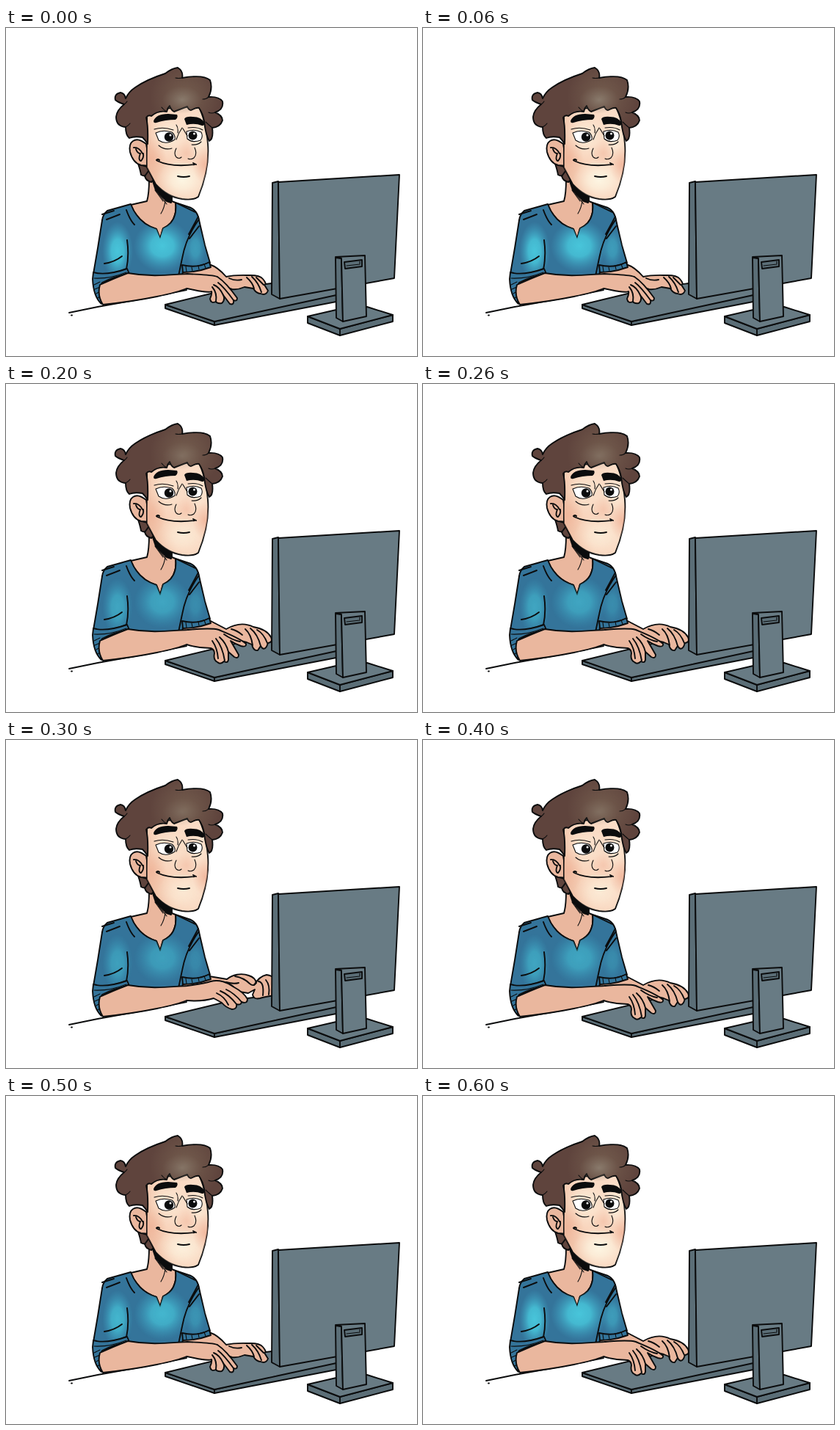
An HTML page that plays this animation: 560 px wide and 447 px high, repeating every 700 ms.

```html
<!DOCTYPE html>
<html lang="en">
<head>
<meta charset="utf-8">
<title>Man typing</title>
<style>
html, body { margin: 0; width: 100%; height: 100%; overflow: hidden; background: #fff; }
svg { display: block; width: 560px; height: 447px; }
.ink { stroke: #0b0c0d; stroke-width: 1.9; stroke-linejoin: round; stroke-linecap: round; fill: none; }
.thin { stroke-width: 1.1; }
.skin { fill: #eab79e; }
.hair { fill: url(#hairTone); }
.shirt { fill: #34749a; }
.panel { fill: #687b84; }
.side { fill: #5b6e77; }
.flat { stroke: none; }
.dark { fill: #0b0c0d; }
</style>
</head>
<body>
<svg viewBox="0 0 560 447">
  <defs>
    <radialGradient id="hairTone" gradientUnits="userSpaceOnUse" cx="244" cy="94" r="48">
      <stop offset="0" stop-color="#755e4f"/><stop offset="1" stop-color="#5f443d"/>
    </radialGradient>
    <linearGradient id="faceTone" gradientUnits="userSpaceOnUse" x1="190" y1="180" x2="262" y2="160">
      <stop offset="0" stop-color="#efbfa4"/><stop offset=".4" stop-color="#f9d5bd"/><stop offset="1" stop-color="#fadcc6"/>
    </linearGradient>
    <radialGradient id="blue">
      <stop offset="0" stop-color="#48c5da"/><stop offset=".4" stop-color="#45bcd3" stop-opacity=".95"/><stop offset="1" stop-color="#3f9fc0" stop-opacity="0"/>
    </radialGradient>
    <radialGradient id="pale">
      <stop offset="0" stop-color="#fdf6e3"/><stop offset=".4" stop-color="#fcf1dd" stop-opacity=".8"/><stop offset="1" stop-color="#fcebd8" stop-opacity="0"/>
    </radialGradient>
    <radialGradient id="blush">
      <stop offset="0" stop-color="#eeab90" stop-opacity=".7"/><stop offset="1" stop-color="#eeb398" stop-opacity="0"/>
    </radialGradient>
    <radialGradient id="shine">
      <stop offset="0" stop-color="#958a7c" stop-opacity=".65"/><stop offset="1" stop-color="#85766a" stop-opacity="0"/>
    </radialGradient>
    <path id="torso" d="M170 240L138 249Q132 254 131 262L125 300L119 335Q140 338 164 328L163 342H240L241 330 278 320 271 296 264 266Q262 250 252 245L231 238Q234 264 214 273L210 287 205 274Q180 266 170 240Z"/>
    <path id="head" d="M192 112L262 106Q272 125 275 158C277 184 271 208 262 230Q256 235 240 233Q220 230 204 213L192 190Z"/>
    <clipPath id="inTorso"><use href="#torso"/></clipPath>
    <clipPath id="inHead"><use href="#head"/></clipPath>
  </defs>

  <g class="ink">
    <path d="M86 388L125 380Q185 370 246 357M89 391.5h1"/>
    <path class="side" d="M217 377V382L284 405 450 373V362L284 400Z"/>
    <path class="panel" d="M217 377L312 354 362 348 450 350V364L284 400Z"/>
    <path d="M284 400V405"/>

    <path id="far" class="skin"/>
    <path id="farLines"/>

    <path class="skin" d="M195 206Q195 226 192 236L170 241Q180 266 205 274L210 287 214 273Q234 264 231 238L226 236V226L200 204Z"/>
    <use href="#torso" class="shirt"/>
    <g class="flat" clip-path="url(#inTorso)">
      <g class="glow">
        <ellipse cx="152" cy="304" rx="21" ry="40" fill="url(#blue)"/>
        <ellipse cx="213" cy="297" rx="39" ry="36" fill="url(#blue)"/>
        <ellipse cx="258" cy="300" rx="15" ry="28" fill="url(#blue)" opacity=".5"/>
      </g>
    </g>
    <path d="M164 329Q168 310 165 289M131 254L147 249M137 261L155 254M262 262Q245 286 240 314L235 338M263 270L250 287M233 239L258 251M262 257L249 281M164 248Q169 262 175 268M134 321Q148 319 158 311"/>
    <path class="shirt" d="M119 333Q136 338 165 328L168 335Q149 338 131 347Q127 353 130 376Q119 366 118 342ZM240 323Q261 328 277 319L279 326Q260 333 241 333Z"/>
    <path class="thin" d="M120 341Q142 342 164 333M120 350L128 346M121 356L128 353M123 362L128 359M125 368L129 365M245 325L246 332M253 326L254 331M262 324L263 329M270 322L272 327"/>
    <path id="near" class="skin"/>
    <path id="nearLines"/>
  </g>

  <!-- Head -->
  <g class="ink">
    <path class="dark" d="M199 206L204 221 219 236 225 238V230Q211 222 199 206Z"/>
    <path class="thin" d="M203 221L214 236M208 226L219 240M217 235Q216 245 211 253"/>
    <path class="hair" d="M180 185Q183 194 184 200Q187 202 189 201Q190 208 198 210L202 206 195 190Z"/>
    <path d="M189 202L194 195"/>
    <path class="skin" d="M191 158Q180 149 173 154Q167 158 169 169Q173 184 184 187L196 188Z"/>
    <path d="M174 163Q181 162 186 171M177 165Q179 171 183 171Q180 179 183 181M187 171Q188 177 184 181"/>
    <use href="#head" fill="url(#faceTone)"/>
    <g class="flat" clip-path="url(#inHead)">
      <g class="glow">
        <ellipse cx="240" cy="207" rx="36" ry="29" fill="url(#pale)"/>
        <ellipse cx="222" cy="146" rx="30" ry="34" fill="url(#pale)" opacity=".6"/>
        <ellipse cx="262" cy="148" rx="16" ry="34" fill="url(#pale)" opacity=".6"/>
      </g>
      <ellipse cx="246" cy="171" rx="17" ry="18" fill="url(#blush)" opacity=".55"/>
      <ellipse cx="271" cy="186" rx="17" ry="26" fill="url(#blush)"/>
      <ellipse cx="198" cy="178" rx="20" ry="30" fill="url(#blush)" opacity=".8"/>
    </g>
    <path class="hair" d="M193 158Q194 134 191 122Q194 118 198 120Q207 112 219 114Q220 109 223 106Q225 112 229 114Q239 110 247 107Q249 112 252 112Q260 108 263 109Q268 116 270 127Q272 146 277 154Q283 151 281 136Q292 135 295 126Q295 119 285 115Q297 111 295 100Q290 93 276 94Q282 82 278 71Q269 63 240 68Q242 59 234 54Q226 55 217 62Q192 70 176 81Q167 87 163 96Q162 89 156 88Q147 90 149 98Q152 101 161 104Q151 112 150 121Q150 134 163 135Q163 146 168 150Q175 147 186 149Q190 153 193 158Z"/>
    <ellipse class="glow flat" cx="240" cy="98" rx="27" ry="19" fill="url(#shine)"/>
    <path class="thin" d="M161 104Q163 103 165 100M163 135Q167 133 169 130M240 68Q235 69 231 68M276 94Q273 97 268 97M285 115Q280 117 276 115M272 128Q276 132 281 136M219 114Q214 111 212 108"/>
    <path class="dark flat" d="M201 127Q204 117 221 117L233 118Q235 122 231 125Q217 125 205 129Q201 130 201 127ZM243 124Q245 120 255 121Q266 121 270 129Q271 133 267 133Q257 129 246 132Z"/>
    <path class="thin" d="M202 138Q214 134 228 139M248 136Q260 134 268 139M208 160Q216 167 226 164M253 159Q261 160 266 155M232 132Q235 136 234 143"/>
    <path class="thin" fill="#fff" d="M204 143Q214 138 226 142Q231 146 230 152Q218 160 208 153ZM246 141Q257 137 266 142Q269 148 265 153Q254 157 247 151Z"/>
    <g class="dark flat">
      <circle cx="222" cy="148.5" r="6.2"/><circle cx="254.5" cy="146.5" r="6"/>
      <g fill="#fff"><circle cx="224" cy="146" r="1.5"/><circle cx="256.5" cy="144" r="1.5"/></g>
    </g>
    <path class="thin" d="M240 136Q235 143 232 152M241 137L247 147M232 164Q228 171 232 176Q236 179 239 176M257 163Q261 172 256 177Q252 180 248 178"/>
    <path d="M205 180Q207 178 209 180M206 181Q225 190 257 186M255 184L259 186M234 202Q242 204 250 202"/>
  </g>

  <!-- Monitor -->
  <g class="ink">
    <path class="side" d="M363 211L371 209 373 369 362 363Z"/>
    <path class="panel" d="M371 210L536 200 529 341 373 369Z"/>
    <path class="side" d="M411 393V402L455 419 527 400V391L455 410Z"/>
    <path class="panel" d="M411 393L450 384 492 380 527 391 455 410Z"/>
    <path d="M455 410V419"/>
    <path class="side" d="M449 313L457 314 459 400 450 395Z"/>
    <path class="panel" d="M449 312L489 310 491 393 459 400 457 314Z"/>
    <path class="side" d="M461 319L485 316V325L462 328Z"/>
    <path class="thin" d="M464 324L482 322V318"/>
  </g>
</svg>

<script>
// Each pose: outline and finger creases for the far hand, then the near hand.
const poses = {
  rest: {
    far: "Q289 326 300 339C312 336 325 337 333 337Q346 337 350 342Q356 349 352 350L357 358Q354 365 347 362Q341 362 337 355L325 353Q316 357 308 356L290 350",
    farLines: "M328 340Q336 347 338 355M335 339Q344 347 348 360M341 340L351 350M304 341Q312 345 321 343",
    near: "C262 336 280 336 288 339Q300 347 315 368Q315 373 310 371Q311 378 305 376L296 364Q299 371 294 375Q288 376 286 373Q279 376 278 369Q281 362 280 359C274 362 258 357 246 355",
    nearLines: "M281 353Q288 361 286 373M283 350Q291 353 296 364M289 347Q297 353 310 371"
  },
  lift: {
    far: "L301 326C308 320 320 317 331 321Q340 324 341 331L338 334Q345 322 355 320Q363 321 366 326V348Q352 350 346 352Q337 354 336 347L339 340 330 345 300 340",
    farLines: "M312 322Q324 324 332 332Q338 337 341 330M344 329Q352 330 350 348M354 327Q360 334 358 347",
    near: "C262 333 270 332 279 329C290 326 302 330 311 337Q324 344 329 353Q329 360 321 357Q320 362 314 360Q315 367 308 367Q300 365 294 358L283 352C270 356 258 356 246 355",
    nearLines: "M300 340Q311 345 321 357M292 342Q304 347 314 360M287 345Q298 350 303 361M300 330Q310 333 317 331"
  },
  press: {
    far: "L300 334C312 327 325 325 337 331Q355 334 361 345Q364 352 357 353L355 358Q351 364 347 357L343 363Q337 364 335 355L328 352 300 345",
    farLines: "M326 334Q334 341 336 356M333 333Q343 341 347 357M342 335Q351 340 356 353M307 334Q315 336 322 342",
    near: "C260 334 280 332 290 335C302 340 318 346 327 354Q328 359 320 357Q312 354 306 350L317 369Q317 375 311 372L303 365 303 376Q302 381 297 378Q292 383 288 379Q282 376 284 367Q284 362 279 360Q262 360 246 355",
    nearLines: "M281 350Q288 360 289 374M286 347Q295 358 298 377M291 345Q300 353 303 365M297 341Q308 349 319 351"
  }
};
const steps = ["rest", "lift", "press", "lift", "press", "rest", "press"];
const light = [1, .85, .62, .55, .62, .82, 1];
const part = id => document.getElementById(id);
const glows = document.querySelectorAll(".glow");

function draw(now) {
  const i = Math.floor(now / 100) % steps.length;
  const p = poses[steps[i]];
  part("far").setAttribute("d", `M240 330L277 322${p.far}L240 342Z`);
  part("near").setAttribute("d", `M128 350Q145 342 166 334C200 340 225 336 247 335${p.near}C232 361 190 371 132 377Q124 364 128 350Z`);
  part("farLines").setAttribute("d", p.farLines);
  part("nearLines").setAttribute("d", p.nearLines);
  glows.forEach(g => g.setAttribute("opacity", light[i]));
}

const start = performance.now();
function tick() {
  draw(performance.now() - start);
  requestAnimationFrame(tick);
}
tick();
</script>
</body>
</html>
```
